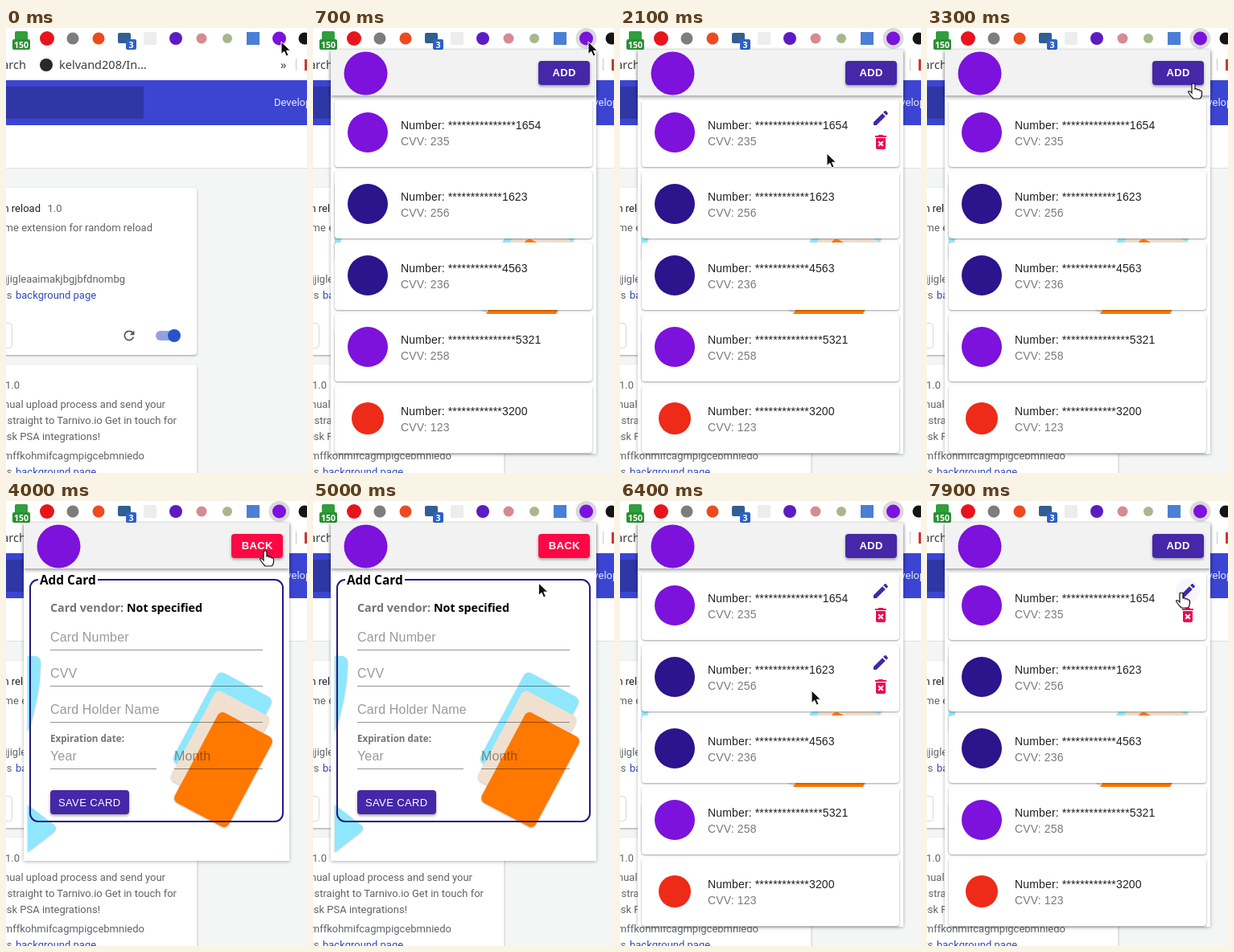
Write an HTML page that moves like this. It is 374 px wide and 554 px high and loops after 8 s.

```html
<!DOCTYPE html>
<html lang="en">
<head>
<meta charset="utf-8">
<title>Card wallet extension</title>
<style>
  html, body { margin: 0; width: 100%; height: 100%; overflow: hidden; background: #fff; }
  svg { display: block; width: 374px; height: 554px; }
  text { white-space: pre; }
  .page { font: 13px Roboto, sans-serif; fill: #5f6368; }
  .bar { font: 14.5px "Noto Sans", sans-serif; fill: #3c3c3c; }
  .row { font: 14px "Liberation Sans", Arial, sans-serif; letter-spacing: .15px; fill: #212121; }
  .field { font: 16px "Liberation Sans", Arial, sans-serif; letter-spacing: .15px; fill: rgba(0,0,0,.4); }
  .button { font: 13px "Liberation Sans", Arial, sans-serif; letter-spacing: .37px; fill: #fff; }
  .bold { font-family: "Noto Sans", sans-serif; font-weight: 700; }
  .badge { font: 700 10.5px "Noto Sans", sans-serif; fill: #fff; }
  .paper { filter: drop-shadow(0 1px 1px rgba(0,0,0,.38)); }
  .raised { filter: drop-shadow(0 2px 1.5px rgba(0,0,0,.25)) drop-shadow(0 1px 2px rgba(0,0,0,.12)); }
  .popup { filter: drop-shadow(0 0 .6px rgba(0,0,0,.6)) drop-shadow(0 1px 2px rgba(0,0,0,.3)); }
</style>
</head>
<body>
<svg id="stage" viewBox="0 0 374 554"></svg>
<script>
const LOOP = 8000, STEP = 100;
const PURPLE = '#7c12dc', INDIGO = '#4527a8', RED = '#ff0744', DARK_RED = '#d00458';
const EDIT = 'M3 17.25V21h3.75L17.81 9.94l-3.75-3.75L3 17.25zM20.71 7.04c.39-.39.39-1.02 0-1.41l-2.34-2.34c-.39-.39-1.02-.39-1.41 0l-1.83 1.83 3.75 3.75 1.83-1.83z';
const REMOVE = 'M6 19c0 1.1.9 2 2 2h8c1.1 0 2-.9 2-2V7H6v12zm2.46-7.12l1.41-1.41L12 12.59l2.12-2.12 1.41 1.41L13.41 14l2.12 2.12-1.41 1.41L12 15.41l-2.12 2.12-1.41-1.41L10.59 14l-2.13-2.12zM15.5 4l-1-1h-5l-1 1H5v2h14V4z';
const RELOAD = 'M17.65 6.35C16.2 4.9 14.21 4 12 4c-4.42 0-7.99 3.58-7.99 8s3.57 8 7.99 8c3.73 0 6.84-2.55 7.73-6h-2.08c-.82 2.33-3.04 4-5.65 4-3.31 0-6-2.69-6-6s2.69-6 6-6c1.66 0 3.14.69 4.22 1.78L13 11h7V4l-2.35 2.35z';

const rect = (x, y, w, h, fill, extra = '') =>
  `<rect x="${x}" y="${y}" width="${w}" height="${h}" fill="${fill}" ${extra}/>`;
const circle = (x, y, r, fill, extra = '') =>
  `<circle cx="${x}" cy="${y}" r="${r}" fill="${fill}" ${extra}/>`;
const text = (x, y, cls, str, extra = '') =>
  `<text x="${x}" y="${y}" class="${cls}" ${extra}>${str}</text>`;
const endText = (x, y, cls, str, extra = '') => text(x, y, cls, str, 'text-anchor="end" ' + extra);
const glyph = (x, y, d, fill, scale = 1) =>
  `<path transform="translate(${x} ${y}) scale(${scale})" d="${d}" fill="${fill}"/>`;
const rule = (x1, x2, y) => rect(x1, y, x2 - x1, 1, 'rgba(0,0,0,.42)');

function toolbar() {
  const dots = [[51, 9, '#e8141c'], [83, 7.5, '#7d7d7d'], [115, 7.5, '#ee4a20'], [211, 8, '#5c1cc4'],
    [243, 6.5, '#d68a92'], [275, 6, '#a9b78c'], [371, 7.5, '#151515']];
  return rect(0, 0, 374, 65, '#fff') +
    rect(11, 4, 16, 14, '#2f9e3c', 'rx="2"') + rect(8, 14, 22, 13, '#2b8f35', 'rx="2"') +
    text(19, 24.5, 'badge', '150', 'text-anchor="middle"') +
    dots.map(([x, r, fill]) => circle(x, 13, r, fill)).join('') +
    rect(139, 6, 16, 13, '#315f91', 'rx="2"') + rect(149, 14, 13, 13, '#2d62c8', 'rx="2"') +
    text(155.5, 24.5, 'badge', '3', 'text-anchor="middle"') +
    rect(171, 5, 16, 16, '#ededed', 'rx="2"') + rect(299, 5, 16, 16, '#4b7fd6') +
    circle(339.5, 13, 13, '#d9d9dc', 'id="halo"') + circle(339.5, 13, 8.5, PURPLE) +
    endText(25, 51, 'bar', 'Search') + circle(50, 46, 8, '#24292e') +
    text(66, 51, 'bar', 'kelvand208/In…') + text(341, 51, 'bar', '»') +
    rect(360, 38, 1, 15, '#c8c8c8') + rect(371, 39, 3, 14, '#c63a34');
}

function page() {
  const link = y => text(12, y, 'page', 'background page', 'style="fill:#3049b5"') +
    endText(7.5, y, 'page', 'Inspect views');
  return rect(0, 65, 374, 56, '#3b45d2') + rect(0, 73, 171, 40, '#2f37a6') +
    text(333, 97, 'page', 'Developer mode', 'style="fill:#e4e6fa"') +
    rect(0, 121, 374, 53, '#fff') + rect(0, 174, 374, 1, '#dfe1e2') + rect(0, 175, 374, 379, '#f4f6f6') +
    rect(-20, 199, 257.5, 208, '#fff', 'rx="4" class="paper"') +
    rect(-20, 419, 257.5, 160, '#fff', 'rx="4" class="paper"') +
    endText(43, 229, 'page', 'random reload', 'style="fill:#202124"') + text(51.5, 229, 'page', '1.0') +
    endText(182, 253, 'page', 'Awesome extension for random reload') +
    endText(148, 317, 'page', 'jjigleaaimakjbgjbfdnombg') + link(337) +
    rect(-20, 367.5, 27.5, 31, '#fff', 'rx="4" stroke="#d5d7da"') +
    glyph(143.4, 373.4, RELOAD, '#505357', .8) +
    rect(186, 377, 29, 12, '#91a2e4', 'rx="6"') + circle(209, 383, 8, '#2853ce') +
    text(-1, 449, 'page', '1.0') +
    endText(198, 473, 'page', 'manual upload process and send your') +
    endText(212, 493, 'page', 'straight to Tarnivo.io Get in touch for') +
    endText(117, 513, 'page', 'desk PSA integrations!') +
    endText(172, 537, 'page', 'mffkohmifcagmpigcebmniedo') + link(557);
}

function backdrop() {
  const card = (x, y, fill) =>
    rect(-38, -63.5, 76, 127, fill, `rx="7" transform="translate(${x} ${y}) rotate(28)"`);
  return `<g style="filter:drop-shadow(0 1px 1px rgba(0,0,0,.25))">
    <path fill="#8ee7fd" d="M27 193h10q7 2 6 11Q42 245 27 288zM27 378L58 402q8 5 0 11L27 437z"/>
    ${card(269, 285, '#8ee7fd')}${card(266, 308, '#f0e0d0')}${card(270, 334.5, '#ff7800')}</g>`;
}

const ROWS = [
  { stars: 15, last: '1654', cvv: 235, r: 25, fill: PURPLE },
  { stars: 12, last: '1623', cvv: 256, r: 25, fill: '#2b148c' },
  { stars: 12, last: '4563', cvv: 236, r: 25, fill: '#2b148c' },
  { stars: 15, last: '5321', cvv: 258, r: 25, fill: PURPLE },
  { stars: 12, last: '3200', cvv: 123, r: 20, fill: '#ee2a18' },
];

const list = () => ROWS.map((row, i) => `<g transform="translate(0 ${i * 89})">` +
  rect(27, 89, 320, 84, '#fff', 'rx="4" class="paper"') + circle(68, 130, row.r, row.fill) +
  text(109, 126, 'row', `Number: ${'*'.repeat(row.stars)}${row.last}`) +
  text(109, 146, 'row', `CVV: ${row.cvv}`, 'style="fill:#7a7a7a"') +
  `<g id="tools${i}">` + (i ? '' : circle(324, 112, 15, '#f7f6fc', 'id="editHalo"')) +
  glyph(312, 100, EDIT, INDIGO) + glyph(312, 130, REMOVE, '#ee0a50') + '</g></g>').join('');

const form = () =>
  rect(30, 98, 314, 301, 'none', 'rx="10" stroke="#251a80" stroke-width="2"') +
  rect(40, 95, 74, 6, '#fff') +
  text(42, 104, 'bold', 'Add Card', 'font-size="15.4"') +
  text(55, 138, 'bold', 'Card vendor:', 'font-size="14.3" fill="#757575"') +
  text(150, 138, 'bold', 'Not specified', 'font-size="14.3"') +
  ['Card Number', 'CVV', 'Card Holder Name'].map((label, i) =>
    text(55, 175 + 45 * i, 'field', label) + rule(55, 319, 185 + 45 * i)).join('') +
  text(55, 300, 'bold', 'Expiration date:', 'font-size="11.6" fill="#757575"') +
  text(55, 323, 'field', 'Year') + rule(55, 187, 333) +
  text(209, 323, 'field', 'Month') + rule(209, 319, 333) +
  rect(55, 360, 98, 30, INDIGO, 'rx="4" class="raised"') + text(65, 380, 'button', 'SAVE CARD');

const stage = document.getElementById('stage');
stage.innerHTML = `
  <clipPath id="buttonClip"><rect x="280" y="41" width="64" height="30" rx="4"/></clipPath>
  ${page()}${toolbar()}
  <g id="popup">
    <rect id="sheet" class="popup" x="22" y="27" width="330" fill="#fff"/>
    ${backdrop()}
    <g id="list">${list()}</g><g id="form">${form()}</g>
    ${rect(22, 27, 330, 57, '#f2f2f2', 'style="filter:drop-shadow(0 2px 2px rgba(0,0,0,.4))"')}
    ${circle(65.5, 56.5, 27, PURPLE)}
    ${rect(280, 41, 64, 30, INDIGO, 'id="action" rx="4" class="raised"')}
    <g clip-path="url(#buttonClip)"><circle id="ripple" r="26" fill="#fff" opacity=".25"/></g>
    <text id="label" class="button" x="312.2" y="60" text-anchor="middle" style="font-weight:700"></text>
  </g>
  <g id="cursor">
    <path id="arrow" d="M0 0V15.5L3.7 12.2 6.2 18 9 16.8 6.5 11.2H11.5z" fill="#111" stroke="#fff" stroke-linejoin="round"/>
    <path id="hand" d="M-2 2Q-2 0 0 0Q2 0 2 2V7Q4.5 6 5 8Q7.5 7 8 9Q10.5 8.5 10.5 11V14Q10 18 8 19H0Q-3 16-6 11.5Q-7 9.5-5 9.5Q-3.5 10-2 12z" fill="#fff" stroke="#111" stroke-width="1.2"/>
  </g>`;

const el = {};
stage.querySelectorAll('[id]').forEach(node => el[node.id] = node);
const show = (node, on) => node.setAttribute('display', on ? 'inline' : 'none');

// Pointer path: time, x, y
const PATH = [
  [0, 342, 17], [1800, 342, 17], [1900, 334, 42], [2000, 298, 112], [2100, 257, 156],
  [2400, 257, 156], [2600, 286, 163], [2700, 300, 156], [2900, 300, 156], [3100, 320, 112],
  [3200, 328, 84], [3300, 331, 69], [3500, 322, 62], [4800, 322, 62], [4900, 306, 78],
  [5200, 229, 150], [5300, 232, 148], [5500, 286, 92], [5700, 318, 63], [5900, 318, 63],
  [6200, 256, 175], [6400, 238, 236], [7500, 238, 236], [7700, 292, 165], [7900, 316, 114], [LOOP, 316, 114],
];

function pointer(t) {
  const i = PATH.findIndex(key => key[0] > t);
  const [t0, x0, y0] = PATH[i - 1], [t1, x1, y1] = PATH[i];
  const k = (t - t0) / (t1 - t0);
  return [x0 + (x1 - x0) * k, y0 + (y1 - y0) * k];
}

const within = (x, y, left, top, right, bottom) => x >= left && x <= right && y >= top && y <= bottom;

function draw(time) {
  const t = Math.floor(time % LOOP / STEP) * STEP;
  const [x, y] = pointer(t);
  const open = t >= 600, adding = t >= 3900 && t < 6000;
  const onAction = open && within(x, y, 280, 41, 344, 71);
  const onEdit = open && !adding && within(x, y, 309, 97, 339, 127);

  el.halo.setAttribute('r', t < 100 ? 0 : t < 500 ? 9 : 13);
  show(el.popup, open);
  show(el.list, !adding);
  show(el.form, adding);
  el.sheet.setAttribute('height', adding ? 421 : 503);

  const hoverRow = Math.floor((y - 89) / 89);
  ROWS.forEach((_, i) => show(el['tools' + i], hoverRow === i || (i === 0 && t >= 6200)));
  show(el.editHalo, onEdit);

  el.label.textContent = adding ? 'BACK' : 'ADD';
  const settled = onAction && t >= 4200;
  el.action.setAttribute('fill', !adding ? INDIGO : settled ? DARK_RED : RED);
  show(el.ripple, t === 3800 || t === 5900);
  el.ripple.setAttribute('cx', x);
  el.ripple.setAttribute('cy', y);

  el.cursor.setAttribute('transform', `translate(${x} ${y})`);
  show(el.hand, onAction || onEdit);
  show(el.arrow, !(onAction || onEdit));
}

const start = performance.now();
function tick() {
  draw(performance.now() - start);
  requestAnimationFrame(tick);
}
tick();
</script>
</body>
</html>
```
